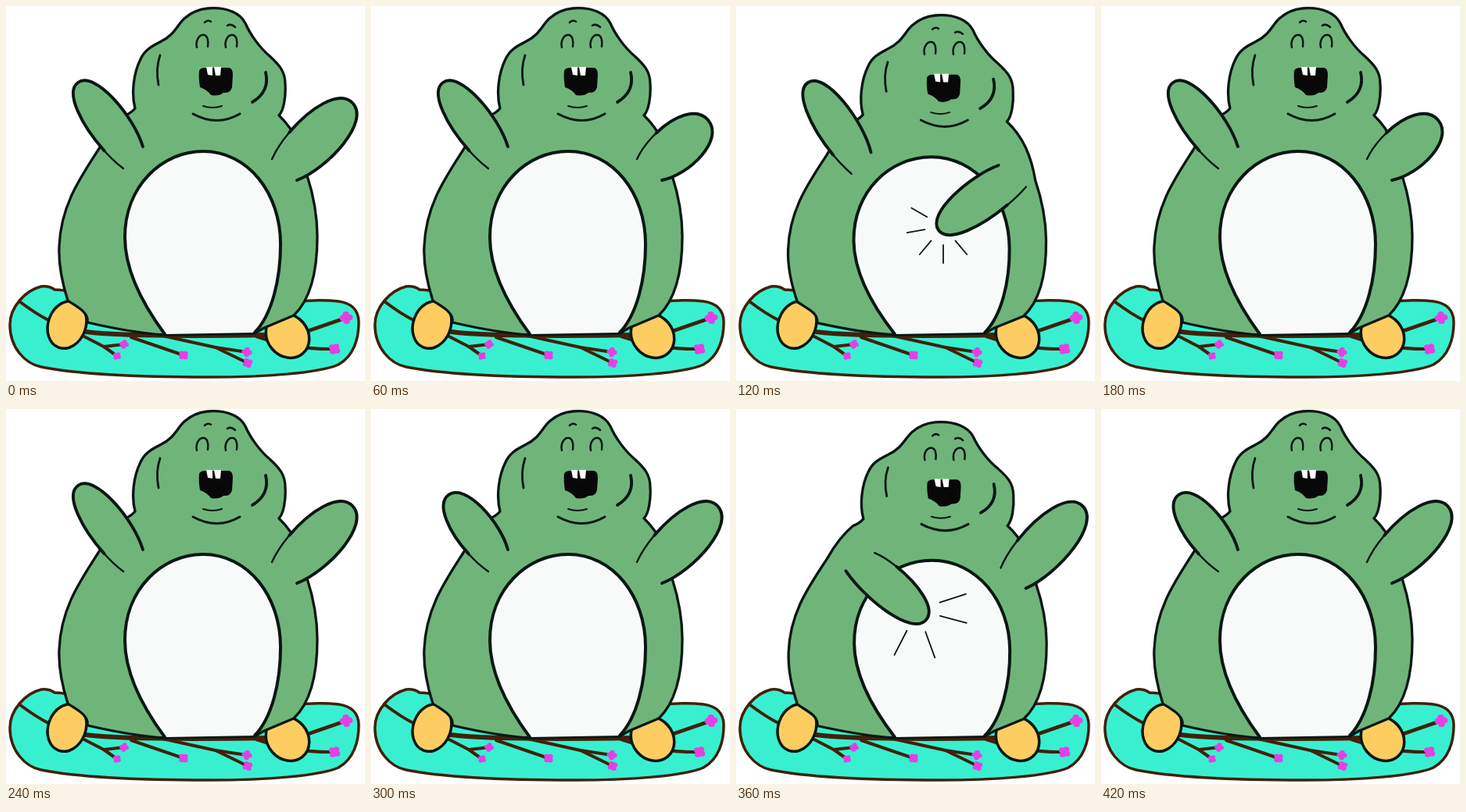
Animation, 459 px wide and 480 px high, one loop 0.48 s. Source, as an HTML page with a canvas:

```html
<!DOCTYPE html>
<html lang="en">
<head>
<meta charset="utf-8">
<title>Belly drummer</title>
<style>
html, body { margin: 0; width: 100%; height: 100%; overflow: hidden; background: #fff; }
canvas { display: block; }
</style>
</head>
<body>
<canvas id="stage" width="459" height="480"></canvas>
<script>
const ctx = document.getElementById('stage').getContext('2d');
const INK = '#0a1713', GREEN = '#6fb57a', BROWN = '#43200a';
const STEP = 60, FLOOR = 420;

const cushion = `M45,359 C25,364 5,385 5,408 C5,438 25,458 45,462 C100,473 190,475 260,475
  C330,475 400,470 425,459 C445,448 451,425 451,405 C451,388 440,380 425,378
  C400,375 380,378 340,380 L120,380 C85,362 72,364 62,363 Q55,358 45,359 Z`;
const body = `M165,131 C160,112 163,86 172,68 C178,55 188,51 197,46 C215,38 219,24 228,16
  C238,7 247,4 258,3 C284,1 300,10 306,22 C312,36 324,53 337,64 C350,76 357,84 357,100
  C358,116 355,134 349,140 C370,160 380,185 385,217 C394,245 398,270 398,295
  C398,340 390,375 368,396 L330,412 L318,419 L203,421 C170,419 130,411 104,405
  C106,392 92,386 79,377 C72,355 67,330 68,308 C70,255 95,220 118,184
  C128,166 140,150 152,140 Q160,137 165,131 Z`;
const belly = `M203,420 C172,378 152,335 152,296 C152,230 200,186 252,186
  C310,186 351,240 351,305 C351,350 340,395 318,418`;
const mouth = `M247,83 Q248,79 256,79 L284,79 Q290,79 290,88 L289,104 Q287,112 278,111
  Q272,116 262,114 Q257,107 248,104 Q246,92 247,83 Z`;
const cheeks = 'M197,63 Q191,80 195,101';
const jowl = 'M332,85 C336,102 330,114 315,123';
const chin = 'M239,138 Q270,155 299,138';
const lip = 'M252,128 Q264,132 276,128';

// Branch: line width, path ending at the blossom, blossom radius.
const branches = [
  [4, 'M17,378 Q38,394 56,403', 0],
  [6, 'M102,417 Q160,424 335,421', 0],
  [4, 'M98,422 L125,436 L142,448', 4.5],
  [4, 'M125,436 L151,433', 5],
  [4, 'M160,424 L227,447', 5.5],
  [4, 'M200,422 L268,437 L309,457', 5.5],
  [4, 'M268,437 L308,443', 5.5],
  [4, 'M320,423 Q370,440 420,439', 6.5],
  [4.5, 'M386,416 L435,399', 7]
];

// Arms run from one shoulder point, round the tip, to the other.
const leftUp = { from: [175, 180], to: [150, 208], fat: 27 };
const rightUp = { from: [372, 223], to: [340, 196], fat: 33 };
const arms = {
  leftHigh: { ...leftUp, tip: [92, 98] },
  leftMid: { ...leftUp, tip: [99, 110] },
  leftDown: { from: [142, 200], to: [179, 176], fat: 27, tip: [243, 270] },
  rightHigh: { ...rightUp, tip: [443, 124] },
  rightMid: { ...rightUp, tip: [431, 146] },
  rightDown: { from: [338, 197], to: [373, 225], fat: 27, tip: [259, 287] }
};

// Squash: the head drops most and the seat stays put.
const squash = (drop, power) => (x, y) => {
  const k = 1 - Math.min(y / FLOOR, 1) ** power;
  return [x - 3 * k, y + drop * k];
};
const still = (x, y) => [x, y];

const rest = { arms: [arms.leftHigh, arms.rightHigh], warp: still };
const rightMid = { arms: [arms.leftHigh, arms.rightMid], warp: still };
const leftMid = { arms: [arms.leftMid, arms.rightHigh], warp: still };
const rightHit = {
  arms: [arms.leftHigh, arms.rightDown], warp: squash(9, 2),
  rays: { x: 265, y: 282, near: 24, far: 47, angles: [50, 90, 130, 170, 210] }
};
const leftHit = {
  arms: [arms.leftDown, arms.rightHigh], warp: squash(14, 1),
  rays: { x: 232, y: 257, near: 30, far: 65, angles: [-18, 15, 70, 117] }
};
const poses = [rest, rightMid, rightHit, rightMid, rest, leftMid, leftHit, leftMid];

const warpPath = (d, warp) =>
  new Path2D(d.replace(/(\d+),(\d+)/g, (_, x, y) => warp(+x, +y).join()));

function fill(path, color) {
  ctx.fillStyle = color;
  ctx.fill(path);
}

function stroke(path, width, color = INK) {
  ctx.lineWidth = width;
  ctx.strokeStyle = color;
  ctx.stroke(path);
}

function disc(x, y, rx, ry, tilt = 0) {
  const path = new Path2D();
  path.ellipse(x, y, rx, ry, tilt, 0, 2 * Math.PI);
  return path;
}

function blossom(x, y, r) {
  for (let i = 0; i < 4; i++) {
    const a = i * Math.PI / 2 + x;
    fill(disc(x + Math.cos(a) * r * 0.6, y + Math.sin(a) * r * 0.6, r * 0.6, r * 0.55), '#e63fe6');
  }
}

function drawCushion() {
  const path = new Path2D(cushion);
  fill(path, '#38f0d0');
  stroke(path, 3.5, BROWN);
  for (const [width, d, r] of branches) {
    stroke(new Path2D(d), width, BROWN);
    if (r) blossom(...d.split(/[ML ]+/).pop().split(',').map(Number), r);
  }
}

function drawFace(warp) {
  const line = (d, width) => stroke(warpPath(d, warp), width);
  for (const x of [0, 37]) {
    line(`M${244 + x},53 C${242 + x},44 ${247 + x},37 ${252 + x},37 C${258 + x},37 ${259 + x},45 ${258 + x},52`, 2.5);
  }
  line('M254,21 Q258,17 262,20', 2.5);
  line('M283,25 Q288,22 293,27', 2.5);
  line(cheeks, 2.8);
  line(jowl, 3.8);
  line(lip, 2);
  line(chin, 3);
  fill(warpPath(mouth, warp), '#080808');
  fill(warpPath('M256,78 L264,78 L264,89 L258,88 Z M266,78 L275,78 L274,89 L268,89 Z', warp), '#fff');
}

// The shoulder rides on the body; the tip stays where it is.
function drawArm({ from, to, tip, fat }, warp) {
  const a = warp(...from), b = warp(...to);
  const dx = tip[0] - (a[0] + b[0]) / 2, dy = tip[1] - (a[1] + b[1]) / 2;
  const reach = Math.hypot(dx, dy), ux = dx / reach, uy = dy / reach;
  const offset = (along, across) => [ux * along - uy * across, uy * along + ux * across];
  const midX = tip[0] - dx, midY = tip[1] - dy;
  const waist = side => {
    const [x, y] = offset(reach * 0.35, side * (fat + 5));
    return [midX + x, midY + y];
  };
  const cap = side => {
    const [x, y] = offset(0, side * fat);
    return [tip[0] + x, tip[1] + y];
  };
  const path = new Path2D();
  path.moveTo(...a);
  path.bezierCurveTo(...waist(1), ...cap(1), ...tip);
  path.bezierCurveTo(...cap(-1), ...waist(-1), ...b);
  fill(path, GREEN);
  stroke(path, 2.4);
  ctx.setLineDash([reach * 1.9, reach * 2]);
  stroke(path, 3.9);
  ctx.setLineDash([]);
}

function drawRays({ x, y, near, far, angles }) {
  const path = new Path2D();
  for (const degrees of angles) {
    const a = degrees * Math.PI / 180;
    path.moveTo(x + near * Math.cos(a), y + near * Math.sin(a));
    path.lineTo(x + far * Math.cos(a), y + far * Math.sin(a));
  }
  stroke(path, 1.8);
}

function draw({ arms, warp, rays }) {
  ctx.fillStyle = '#fff';
  ctx.fillRect(0, 0, 459, 480);
  ctx.lineCap = ctx.lineJoin = 'round';
  drawCushion();
  for (const foot of [disc(78, 408, 24, 31, 0.35), disc(360, 422, 26, 30, -0.7)]) {
    fill(foot, '#fdcd62');
    stroke(foot, 3.5);
  }
  const torso = warpPath(body, warp), tummy = warpPath(belly, warp);
  fill(torso, GREEN);
  stroke(torso, 3.3);
  fill(tummy, '#f8fafa');
  stroke(tummy, 4);
  drawFace(warp);
  arms.forEach(arm => drawArm(arm, warp));
  if (rays) drawRays(rays);
}

function tick(now) {
  draw(poses[Math.floor(now / STEP) % poses.length]);
  requestAnimationFrame(tick);
}
draw(rest);
requestAnimationFrame(tick);
</script>
</body>
</html>
```
